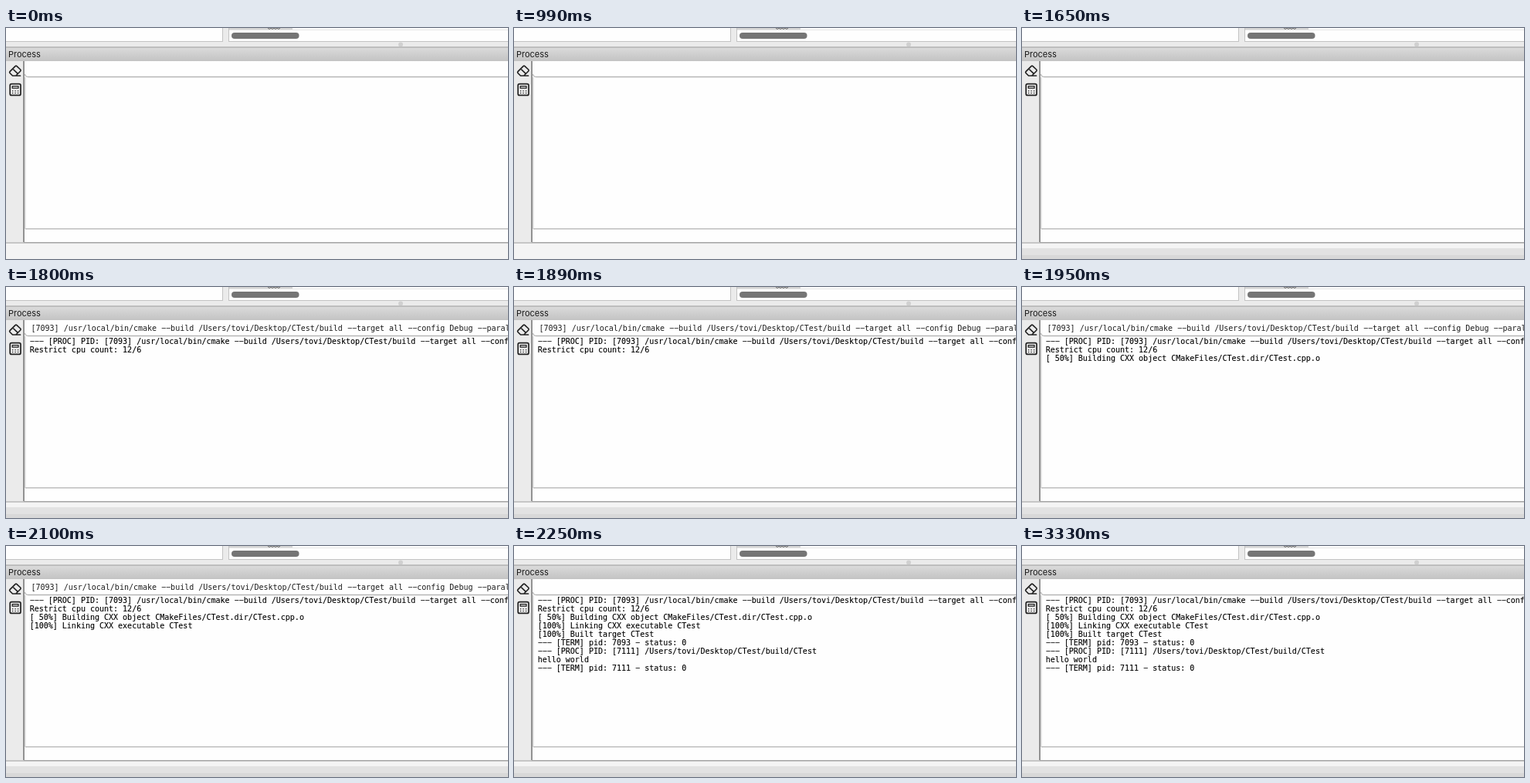
Recreate the animation shown at these times as an HTML page. Size 650 by 300 pixels, loop 4050 ms.

```html
<!DOCTYPE html>
<html lang="en">
<head>
<meta charset="utf-8">
<title>Build process panel</title>
<style>
  html, body { margin: 0; width: 100%; height: 100%; overflow: hidden; background: #ebebeb; }
  svg { display: block; }
  .mono { font: 10px "DejaVu Sans Mono", monospace; white-space: pre; }
  .log { fill: #000; stroke: #000; stroke-width: .12; }
  .command { fill: #1c1c1c; }
  .title { font: 11px Inter, sans-serif; fill: #1a1a1a; }
  .icon { fill: none; stroke: #222; stroke-width: 1.7; stroke-linejoin: round; stroke-linecap: round; }
</style>
</head>
<body>
<svg id="stage" width="650" height="300" viewBox="0 0 650 300">
  <defs>
    <linearGradient id="bar" x2="0" y2="1">
      <stop stop-color="#dadada"/>
      <stop offset="1" stop-color="#c3c3c3"/>
    </linearGradient>
  </defs>
  <rect width="650" height="300" fill="#ebebeb"/>

  <!-- editor panes above the splitter -->
  <path d="M0 0H281V18H0ZM288 0H650V18H288Z" fill="#c3c3c3"/>
  <path d="M0 0H280V17H0ZM289 0H650V17H289Z" fill="#fefefe"/>
  <path d="M289 0H371V2H289Z" fill="#d4d4d4"/>
  <path d="M289 2H650V3H289Z" fill="#e6e6e6"/>
  <path d="M339 0l2 1.5 2-1.5 2 1.5 2-1.5 2 1.5 2-1.5 2 1.5 2-1.5" fill="none" stroke="#444" stroke-width=".8"/>
  <rect x="292" y="6" width="87.5" height="8" rx="4" fill="#757575"/>
  <circle cx="511" cy="21.5" r="3" fill="#d0d0d0"/>

  <!-- title bar -->
  <rect y="24" width="650" height="2" fill="#bebebe"/>
  <rect y="26" width="650" height="17" fill="url(#bar)"/>
  <text class="title" x="3" y="38">Process</text>

  <!-- output panel -->
  <rect x="24" y="43" width="626" height="235" fill="#fefefe"/>
  <path d="M24.5 60Q25 63.5 29 63.5H650" fill="none" stroke="#b5b5b5" stroke-width="1.3"/>
  <rect x="24" y="64" width="1.5" height="197" fill="#d6d6d6"/>
  <rect x="25" y="260" width="625" height="1.6" fill="#c2c2c2"/>
  <rect x="22" y="43" width="2" height="236" fill="#929292"/>
  <rect y="280" width="650" height="20" fill="#f4f4f4"/>
  <rect y="278" width="650" height="2" fill="#c6c6c6"/>
  <rect x="23" y="278" width="627" height="1" fill="#a6a6a6"/>

  <g class="icon">
    <path d="M8.5 62L5 58.5Q4.3 57.5 5 56.6L12 49.6Q13 48.8 14 49.6L18.7 54Q19.5 55 18.7 56L12.7 62ZM8.7 53L15.3 59.3M12.7 62H18.5"/>
    <rect x="5.2" y="72.6" width="13.8" height="14.8" rx="2"/>
    <rect x="8.2" y="75.6" width="7.8" height="2.6" stroke-width="1.3"/>
    <path d="M8.6 81.7h.01M12.1 81.7h.01M15.6 81.7h.01M8.6 84.5h.01M12.1 84.5h.01M15.6 84.5h.01" stroke-width="1.5"/>
  </g>

  <g id="progress">
    <rect y="286" width="650" height="9" fill="#e2e2e2"/>
    <rect y="295" width="650" height="5" fill="#d8d8d8"/>
  </g>
</svg>

<script>
  const LOOP = 4050;
  const home = '/Users/tovi/Desktop/CTest/build';
  const command = `[7093] /usr/local/bin/cmake --build ${home} --target all --config Debug --parallel 6`;

  // [time shown, line]
  const log = [
    [1800, `--- [PROC] PID: ${command}`],
    [1800, 'Restrict cpu count: 12/6'],
    [1950, '[ 50%] Building CXX object CMakeFiles/CTest.dir/CTest.cpp.o'],
    [2100, '[100%] Linking CXX executable CTest'],
    [2250, '[100%] Built target CTest'],
    [2250, '--- [TERM] pid: 7093 - status: 0'],
    [2250, `--- [PROC] PID: [7111] ${home}/CTest`],
    [2250, 'hello world'],
    [2250, '--- [TERM] pid: 7111 - status: 0']
  ];

  const stage = document.getElementById('stage');

  function addText(kind, x, y, content) {
    const text = document.createElementNS('http://www.w3.org/2000/svg', 'text');
    text.setAttribute('class', `mono ${kind}`);
    text.setAttribute('x', x);
    text.setAttribute('y', y);
    text.textContent = content.replace(/-/g, '\u2212'); // wide dashes
    return stage.appendChild(text);
  }

  function showBetween(element, from, to = LOOP) {
    const key = (time, opacity) => ({ offset: time / LOOP, opacity });
    const keys = [key(0, 0), key(from, 0), key(from, 1), key(to, 1)];
    if (to < LOOP) keys.push(key(to, 0), key(LOOP, 0));
    element.animate(keys, { duration: LOOP, iterations: Infinity }).startTime = 0;
  }

  showBetween(document.getElementById('progress'), 1650);
  showBetween(addText('command', 32.5, 57, command), 1800, 2250);
  log.forEach(([time, line], row) => showBetween(addText('log', 30.7, 74 + 11 * row, line), time));
</script>
</body>
</html>
```
